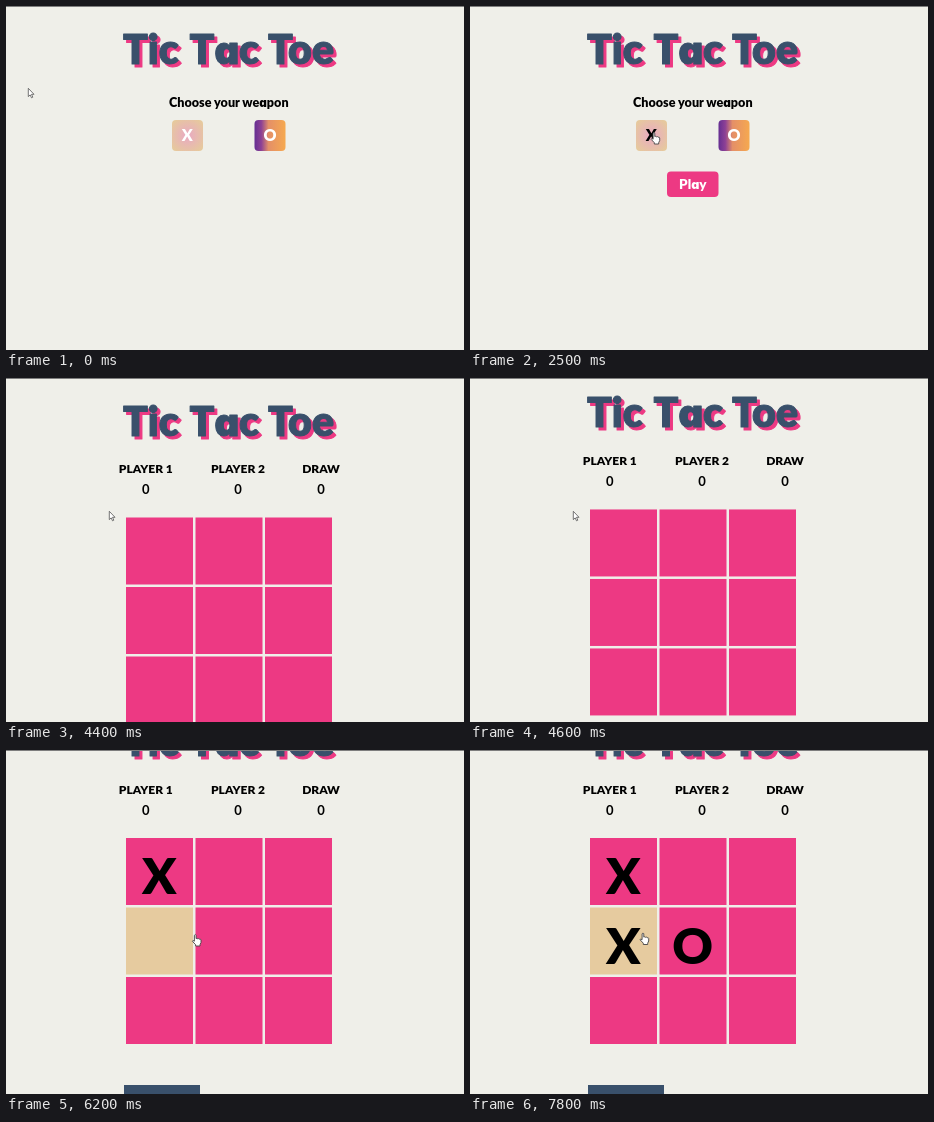
An HTML page for the animation above (8000 ms loop, 458 by 344 pixels).

```html
<!DOCTYPE html>
<html lang="en">
<head>
<meta charset="utf-8">
<title>Tic Tac Toe</title>
<style>
  html, body { margin: 0; width: 100%; height: 100%; overflow: hidden; background: #efefe9; }
  svg { display: block; width: 458px; height: 344px; font-family: Lato, "Open Sans", sans-serif; font-weight: 900; }
  text { text-anchor: middle; }
  .title { font-size: 41px; stroke-width: 1; stroke-linejoin: round; }
  .title text { text-anchor: start; }
  .mark { font-size: 50px; }
  .score { font-size: 12px; }
  .count { font-size: 13px; font-weight: 700; }
  /* single-storey a */
  .a { font-family: Inter, sans-serif; font-size: .93em; font-feature-settings: "cv11"; }
</style>
</head>
<body>
<svg viewBox="0 0 458 344">
  <defs>
    <radialGradient id="rose" r=".62">
      <stop offset="0" stop-color="#e9a9c4"/>
      <stop offset="1" stop-color="#e6c99d"/>
    </radialGradient>
    <linearGradient id="dusk">
      <stop offset="0" stop-color="#652e92"/>
      <stop offset=".22" stop-color="#8d4195"/>
      <stop offset=".45" stop-color="#e48f68"/>
      <stop offset="1" stop-color="#f6a94f"/>
    </linearGradient>
    <g id="title" class="title">
      <text x="117" y="57.5">Tic</text>
      <text x="183.5" y="57.5">T<tspan class="a">a</tspan>c</text>
      <text x="262" y="57.5">Toe</text>
    </g>
  </defs>
  <g id="page">
    <use href="#title" x="3" y="3" fill="#ed3983" stroke="#ed3983"/>
    <use href="#title" fill="#39506b" stroke="#39506b"/>
    <g id="menu">
      <text x="222.8" y="101" font-size="12.6">Choose your we<tspan class="a">a</tspan>pon</text>
      <rect x="166" y="114" width="31" height="31" rx="4" fill="url(#rose)"/>
      <rect x="248.5" y="114" width="31" height="31" rx="4" fill="url(#dusk)"/>
      <g font-size="16" fill="#fff">
        <text id="pickX" x="181.3" y="135">X</text>
        <text x="264" y="135">O</text>
      </g>
      <g id="play">
        <rect x="197" y="165.5" width="51.5" height="25.5" rx="4" fill="#ed3983"/>
        <text x="222.8" y="183" font-size="13.5" fill="#fff">Pl<tspan class="a">a</tspan>y</text>
      </g>
    </g>
    <g id="game">
      <g id="scores" class="score"></g>
      <g id="cells"></g>
      <g id="marks" class="mark"></g>
      <rect x="118" y="386.5" width="76" height="30" fill="#39506b"/>
    </g>
  </g>
  <rect width="458" height="1" fill="#7e7e7e"/>
  <path id="arrow" d="M.3 .3V8.6L2.2 6.9L3.5 9.8L4.8 9.2L3.5 6.3H6Z" fill="#fff" stroke="#555" stroke-width=".8"/>
  <path id="hand" d="M1.6 .3Q2.5-1.3 3.3 .2V3.6Q4.2 2.9 5 3.8Q6 3.2 6.7 4.2Q7.9 3.8 8.2 5V7.5L7.2 9.7V11H2.8V9.7L-.4 6.3Q-.3 4.7 1.6 6.2Z" fill="#fff" stroke="#444" stroke-width=".9" stroke-linejoin="round"/>
</svg>
<script>
const LOOP = 8000, STEP = 100, SCROLL = 51.5;
const CELL = 67, PITCH = 69.5, LEFT = 120, TOP = 139.5;
const $ = id => document.getElementById(id);

function add(parent, tag, attrs, text = "") {
  const el = document.createElementNS("http://www.w3.org/2000/svg", tag);
  for (const k in attrs) el.setAttribute(k, attrs[k]);
  el.textContent = text;
  return $(parent).appendChild(el);
}

[["PLAYER 1", 139.8], ["PLAYER 2", 232], ["DRAW", 315]].forEach(([label, x]) => {
  add("scores", "text", { x, y: 95.3 }, label);
  add("scores", "text", { x, y: 116.2, class: "count" }, "0");
});

const cells = Array.from({ length: 9 }, (_, i) => {
  const x = LEFT + i % 3 * PITCH, y = TOP + Math.floor(i / 3) * PITCH;
  return { x, y, el: add("cells", "rect", { x, y, width: CELL, height: CELL }) };
});

const marks = [[0, "X", 5400], [4, "O", 6600], [3, "X", 7800]].map(([i, sign, at]) => ({
  at, el: add("marks", "text", { x: cells[i].x + 33.2, y: cells[i].y + 56 }, sign)
}));

// Pointer hot spot: time, x, y
const path = [
  [0, 22, 82], [1400, 22, 82], [2200, 181.5, 127], [2500, 181.5, 127],
  [3200, 212, 177], [3700, 212, 177], [4400, 103, 133], [4600, 103, 133],
  [5000, 128, 124.5], [5200, 142, 130], [5900, 142, 130], [6200, 186.8, 185],
  [6400, 214, 197], [7200, 214, 197], [7700, 170.5, 183.5], [LOOP, 170.5, 183.5]
];

const clamp = v => Math.min(1, Math.max(0, v));
const ease = v => v * v * (3 - 2 * v);
const inside = (x, y, l, t, w, h) => x >= l && x <= l + w && y >= t && y <= t + h;
const show = (el, on) => el.setAttribute("visibility", on ? "inherit" : "hidden");

function pointer(t) {
  const i = path.findIndex(p => p[0] > t);
  const [t0, x0, y0] = path[i - 1], [t1, x1, y1] = path[i];
  const k = ease((t - t0) / (t1 - t0));
  return [x0 + (x1 - x0) * k, y0 + (y1 - y0) * k];
}

function draw(time) {
  const t = Math.floor(time % LOOP / STEP) * STEP;
  const [x, y] = pointer(t);
  const playing = t >= 3400;
  const scroll = SCROLL * ease(clamp((t - 4500) / 400));
  $("page").setAttribute("transform", `translate(0 ${-scroll})`);
  show($("menu"), !playing);
  show($("game"), playing);
  show($("play"), !playing && t >= 2500);

  const onX = inside(x, y, 166, 114, 31, 31);
  $("pickX").setAttribute("fill", onX ? "#000" : "#fff");
  let link = !playing && (onX || t >= 2500 && inside(x, y, 197, 165.5, 51.5, 25.5));

  for (const c of cells) {
    const over = playing && inside(x, y + scroll, c.x, c.y, CELL, CELL);
    c.el.setAttribute("fill", over ? "#e6cb9f" : "#ed3983");
    link = link || over;
  }
  for (const m of marks) show(m.el, playing && t >= m.at);

  for (const id of ["arrow", "hand"]) {
    $(id).setAttribute("transform", `translate(${x} ${y})`);
    show($(id), (id === "hand") === link);
  }
}

function tick() {
  draw(performance.now());
  requestAnimationFrame(tick);
}
tick();
</script>
</body>
</html>
```
